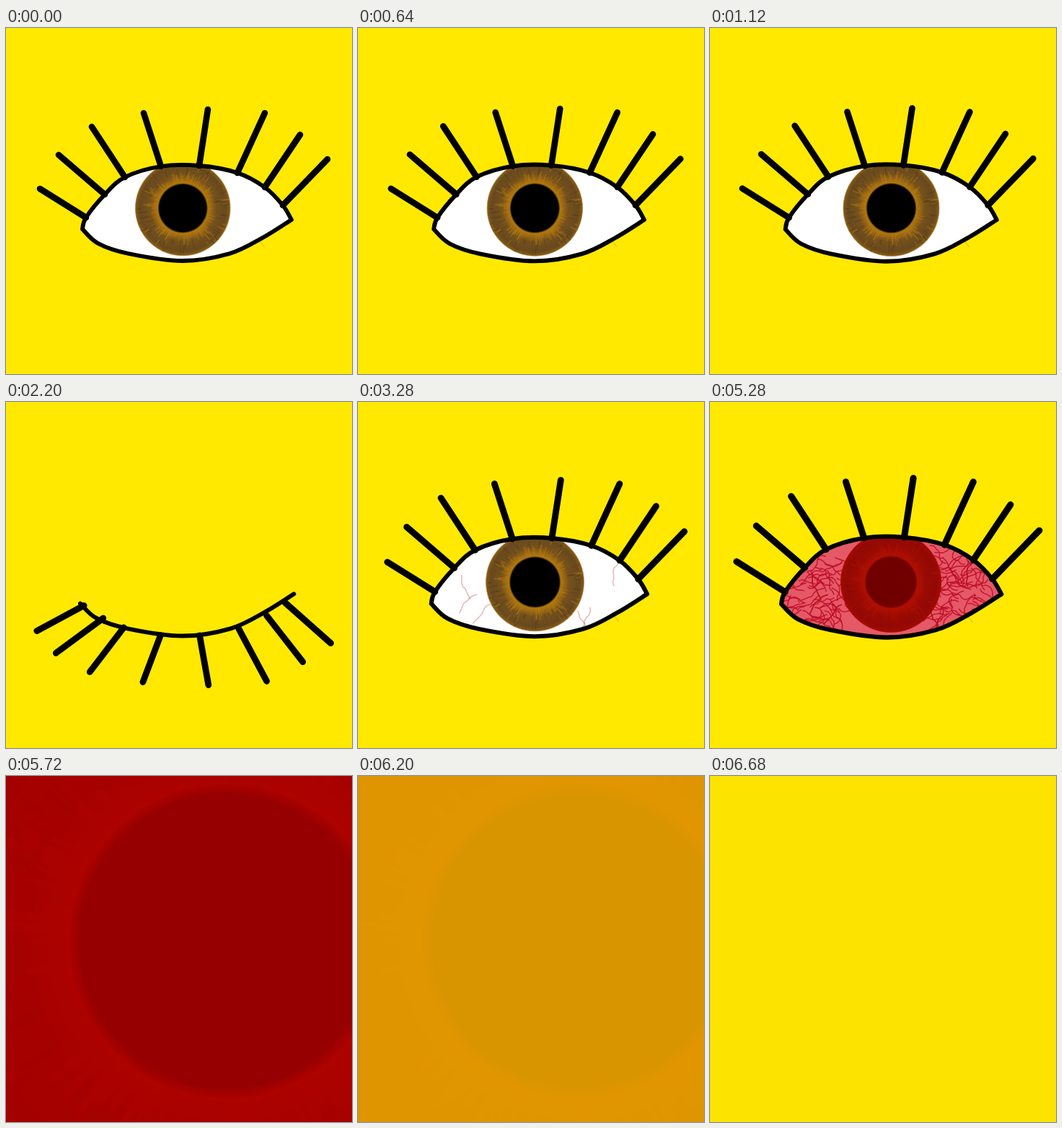
An HTML page with a canvas that plays this animation: 480 by 480 pixels, repeating every 7000 ms.

```html
<!DOCTYPE html>
<html>
<head>
<meta charset="utf-8">
<title>Eye</title>
<style>
html, body { margin: 0; width: 100%; height: 100%; overflow: hidden; background: #ffe900; }
canvas { display: block; width: 100vmin; height: 100vmin; }
</style>
</head>
<body>
<canvas id="stage" width="480" height="480"></canvas>
<script>
const ctx = document.getElementById('stage').getContext('2d');
const LOOP = 7000, STEP = 40, YELLOW = '#ffe900', TAU = Math.PI * 2;
const CENTER = { x: 240, y: 254 };
const IRIS = 66.5, PUPIL = 33.5;

const clamp = v => Math.max(0, Math.min(1, v));
const ramp = (t, a, b) => clamp((t - a) / (b - a));

let seed = 11;
const rnd = (a = 0, b = 1) => {
  seed = (seed * 16807) % 2147483647;
  return a + (b - a) * seed / 2147483647;
};
const times = (n, make) => Array.from({ length: n }, make);

// Smooth curve through all points
function curve(points, path = new Path2D()) {
  const at = i => points[Math.max(0, Math.min(points.length - 1, i))];
  path.lineTo(...points[0]);
  for (let i = 0; i < points.length - 1; i++) {
    const [a, b, c, d] = [at(i - 1), at(i), at(i + 1), at(i + 2)];
    path.bezierCurveTo(
      b[0] + (c[0] - a[0]) / 6, b[1] + (c[1] - a[1]) / 6,
      c[0] - (d[0] - b[0]) / 6, c[1] - (d[1] - b[1]) / 6, ...c);
  }
  return path;
}

// Root on the upper lid, then tip
const lashes = [
  [[111, 263], [47, 223]], [[137, 231], [73, 176]], [[165, 207], [119, 137]], [[215, 192], [191, 118]],
  [[268, 191], [280, 113]], [[321, 201], [359, 118]], [[359, 221], [408, 148]], [[384, 246], [446, 182]]
];
const left = [106, 279], right = [396, 266];
const lower = [right, [356, 291], [310, 313], [245, 323], [170, 313], [128, 299], left];
const eye = curve(lower, curve([left, ...lashes.map(l => l[0]), right]));
eye.closePath();
const closedLid = curve(lower);

function squiggle(x, y, heading, turn) {
  return curve(times(8, () => {
    const point = [x, y];
    heading += rnd(-turn, turn);
    x += 5 * Math.cos(heading);
    y += 5 * Math.sin(heading);
    return point;
  }));
}

// Start and heading of the veins that show first
const mainVeins = [
  [147, 241, 2.2], [167, 267, 2.9], [185, 280, 2.9], [358, 223, 2.3], [303, 289, 0.8], [319, 284, 1.2]
].map(v => squiggle(...v, 0.6));

const fineVeins = times(130, (_, i) => {
  const side = i % 2 ? 1 : -1;
  const x = 245 + side * 148 * Math.sqrt(rnd(0.16, 1));
  return squiggle(x, rnd(208, 314), (side > 0 ? Math.PI : 0) + rnd(-0.7, 0.7), 0.8);
});

const spokes = times(210, () => {
  const inner = rnd() < 0.55;
  const from = inner ? PUPIL : rnd(44, 60);
  return {
    angle: rnd(0, TAU), from, to: Math.min(from + rnd(4, inner ? 18 : 12), IRIS - 1),
    width: rnd(0.7, 2), color: inner || rnd() < 0.35 ? 'rgba(178,120,16,.5)' : 'rgba(78,54,26,.35)'
  };
});

function radial(r, stops) {
  const g = ctx.createRadialGradient(0, 0, 0, 0, 0, r);
  stops.forEach(([at, color]) => g.addColorStop(at / r, color));
  return g;
}

function disc(r, fill) {
  ctx.fillStyle = fill;
  ctx.beginPath();
  ctx.arc(0, 0, r, 0, TAU);
  ctx.fill();
}

function line([x1, y1], [x2, y2], width, color) {
  ctx.lineWidth = width;
  ctx.strokeStyle = color;
  ctx.beginPath();
  ctx.moveTo(x1, y1);
  ctx.lineTo(x2, y2);
  ctx.stroke();
}

function strokeAll(paths, width, color, alpha = 1) {
  ctx.globalAlpha = alpha;
  ctx.lineWidth = width;
  ctx.strokeStyle = color;
  paths.forEach(p => ctx.stroke(p));
  ctx.globalAlpha = 1;
}

function drawIris(x, tint) {
  ctx.save();
  ctx.translate(x, 250);
  disc(IRIS, radial(IRIS, [[PUPIL, '#b87c0c'], [46, '#76511b'], [60, '#67491f'], [65, '#85590f'], [IRIS, 'rgba(133,89,15,.3)']]));
  for (const s of spokes) {
    const at = r => [r * Math.cos(s.angle), r * Math.sin(s.angle)];
    line(at(s.from), at(s.to), s.width, s.color);
  }
  disc(PUPIL + 1.5, radial(PUPIL + 1.5, [[PUPIL - 1, '#000'], [PUPIL + 1.5, 'rgba(0,0,0,0)']]));
  ctx.globalAlpha = tint;
  ctx.globalCompositeOperation = 'multiply';
  disc(IRIS, '#f00');
  ctx.globalCompositeOperation = 'source-over';
  disc(IRIS, '#ac0000');
  ctx.restore();
}

function drawOpen(t) {
  const tint = clamp((t - 4040) / 1900);
  const look = 6 * (ramp(t, 840, 1080) - ramp(t, 2560, 2800)) + 5.2 * ramp(t, 5000, 5240);

  ctx.save();
  ctx.clip(eye);
  ctx.fillStyle = '#fff';
  ctx.fill(eye);
  ctx.fillStyle = `rgba(215,0,20,${tint})`;
  ctx.fill(eye);
  strokeAll(fineVeins, 1.4, '#bc0826', ramp(t, 4000, 5300) * 0.85);
  strokeAll(mainVeins, 1.6, '#b90f1c', ramp(t, 2880, 4300));
  drawIris(245.3 + look, tint);
  ctx.restore();

  line([351, 294], [358, 303], 0.7, 'rgba(150,100,0,.6)');
  strokeAll([eye], 5.8, '#000');
  for (const [root, tip] of lashes) line(root, tip, 8.6, '#000');
}

function drawClosed() {
  strokeAll([closedLid], 5.8, '#000');
  for (const [[x, y], [tipX, tipY]] of lashes) {
    const lid = 323 - 46 * Math.abs((x - 245) / 140) ** 2.5;
    line([x, lid], [tipX, lid + (y - tipY) * 0.86], 8.6, '#000');
  }
}

function render(time) {
  const t = Math.min(Math.floor(time % LOOP / STEP) * STEP, 6680);
  const shot = Math.min(t, 5720);
  const scale = (1 + Math.min(shot, 5300) * 1e-5) * 5.95 ** ramp(shot, 5300, 5720);
  const blink = [1400, 2120].some(b => t >= b && t < b + 160);

  ctx.fillStyle = YELLOW;
  ctx.fillRect(0, 0, 480, 480);
  ctx.save();
  ctx.translate(CENTER.x, CENTER.y);
  ctx.scale(scale, scale);
  ctx.translate(-CENTER.x, -CENTER.y);
  ctx.lineCap = ctx.lineJoin = 'round';
  blink ? drawClosed() : drawOpen(shot);
  ctx.restore();

  ctx.globalAlpha = 0.975 * Math.sin(ramp(t, 5800, 6680) * Math.PI / 2);
  ctx.fillStyle = YELLOW;
  ctx.fillRect(0, 0, 480, 480);
  ctx.globalAlpha = 1;
}

const start = performance.now();
function tick() {
  render(performance.now() - start);
  requestAnimationFrame(tick);
}
tick();
</script>
</body>
</html>
```
